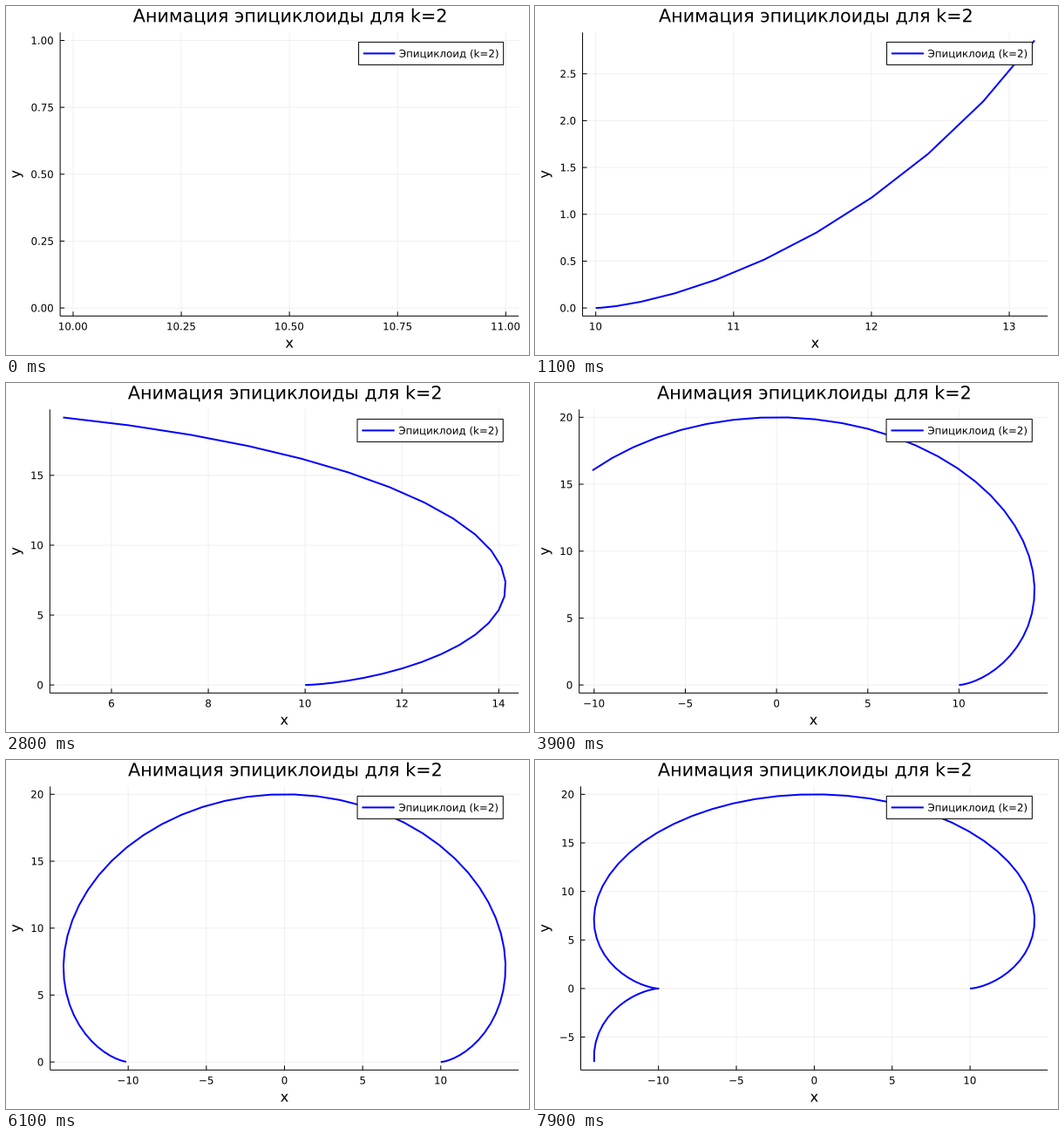
Write a matplotlib script that moves like this. It is 600 px wide and 400 px high and loops after 8 s.

```python
import math

import matplotlib.pyplot as plt
import numpy as np
from matplotlib.animation import FuncAnimation
from matplotlib.patches import PathPatch, Rectangle
from matplotlib.textpath import TextPath
from matplotlib.transforms import Affine2D

plt.rcParams["font.family"] = "DejaVu Sans"

W, H, DPI = 600, 400, 100
FRAMES, INTERVAL = 80, 100
RIGHT, TOP, BOTTOM = 588.2, 30.3, 355.3
PX = 72 / DPI                      # one pixel in points
SMALL, MEDIUM, BIG = 11.85, 16.29, 20.74
RADIUS, K, STEP = 5, 2, 0.05
NICE = [(1, 1.0), (5, 0.9), (2.5, 0.5), (2, 0.7), (3, 0.2)]

fig = plt.figure(figsize=(W / DPI, H / DPI), dpi=DPI, facecolor="white")
ax = fig.add_axes([0, 0, 1, 1])


def ink_width(s, size):
    return TextPath((0, 0), s, size=size).get_extents().width


def text(s, x, y, size, align=0.5, angle=0, zorder=4):
    """Draw text aligned by its ink, with the baseline at y, in pixels."""
    path = TextPath((0, 0), s, size=size)
    box = path.get_extents()
    place = Affine2D().translate(-box.x0 - align * box.width, 0)
    place.scale(1, -1).rotate_deg(-angle).translate(x, y)
    ax.add_patch(PathPatch(path.transformed(place), fc="black", lw=0,
                           zorder=zorder))


def line(xs, ys, color="black", width=1.0, **kw):
    ax.plot(xs, ys, color=color, lw=width * PX, solid_capstyle="butt",
            snap=False, **kw)


def limits(v):
    lo, hi = v.min(), v.max()
    if hi == lo:
        hi = lo + 1
    pad = 0.03 * (hi - lo)
    return lo - pad, hi + pad


def ticks(lo, hi):
    """Pick the tick step scoring best on count, coverage and roundness."""
    span = hi - lo
    best, found = 0, None
    power = math.floor(math.log10(span))
    for z in range(power - 2, power + 2):
        for q, nice in NICE:
            step = q * 10.0 ** z
            first, last = math.ceil(lo / step), math.floor(hi / step)
            n = last - first + 1
            if not 4 <= n <= 8:
                continue
            reach = max(0, math.ceil(hi / step)) - min(0, math.floor(lo / step))
            zero = reach * step < 2 * span
            cover = 1.5 * span / ((n - 1) * step)
            score = (1 - abs(n - 5) / 5) / 4 + zero / 6 + cover / 3 + nice / 4
            if score > best + 1e-9:
                best, found = score, (step, first, last)
    step, first, last = found
    digits = 0
    while abs(round(step, digits) - step) > 1e-6 * step:
        digits += 1
    values = [i * step for i in range(first, last + 1)]
    return values, [f"{v:.{digits}f}".replace("-", "\u2212") for v in values]


def legend(left):
    width = RIGHT - left
    label = f"Эпициклоид (k={K})"
    size = ink_width(label, SMALL)
    x1 = RIGHT - width / 30
    x0 = x1 - size - 0.1008 * width
    start = x1 - 0.0117 * width - size
    ax.add_patch(Rectangle((x0, 41.4), x1 - x0, 26, fc="white", ec="black",
                           lw=PX, snap=False, zorder=5))
    line([x0 + 0.01 * width, start - 0.0097 * width], [54.4, 54.4],
         "blue", 2, zorder=6)
    text(label, start, 58.7, SMALL, align=0, zorder=6)


def draw(i):
    ax.cla()
    ax.set(xlim=(0, W), ylim=(H, 0))
    ax.axis("off")

    t = STEP * np.arange(i + 1)
    x = RADIUS * ((K + 1) * np.cos(t) - np.cos((K + 1) * t))
    y = RADIUS * ((K + 1) * np.sin(t) - np.sin((K + 1) * t))
    (xlo, xhi), (ylo, yhi) = limits(x), limits(y)
    xt, xnames = ticks(xlo, xhi)
    yt, ynames = ticks(ylo, yhi)

    left = 37.3 + max(ink_width(s, SMALL) for s in ynames)
    middle = (left + RIGHT) / 2

    def px(v):
        return left + (v - xlo) / (xhi - xlo) * (RIGHT - left)

    def py(v):
        return BOTTOM - (v - ylo) / (yhi - ylo) * (BOTTOM - TOP)

    for v, name in zip(xt, xnames):
        p = px(v)
        line([p, p], [TOP, BOTTOM], "#f0f0f0", zorder=1)
        line([p, p], [BOTTOM, BOTTOM - 5], zorder=2)
        text(name, p, 371.4, SMALL)
    for v, name in zip(yt, ynames):
        p = py(v)
        line([left, RIGHT], [p, p], "#f0f0f0", zorder=1)
        line([left, left + 5], [p, p], zorder=2)
        text(name, left - 8.2, p + 4.34, SMALL, align=1)

    line([left, RIGHT], [BOTTOM, BOTTOM], zorder=2)
    line([left, left], [TOP, BOTTOM], zorder=2)
    if i:
        line(px(x), py(y), "blue", 2, zorder=3)

    text(f"Анимация эпициклоиды для k={K}", middle, 18.4, BIG)
    text("x", middle, 391.6, MEDIUM)
    text("y", 16.2, (TOP + BOTTOM) / 2, MEDIUM, angle=90)
    legend(left)
    return []


anim = FuncAnimation(fig, draw, frames=FRAMES, interval=INTERVAL,
                     init_func=lambda: [], repeat=True, repeat_delay=0)
plt.show()
```
